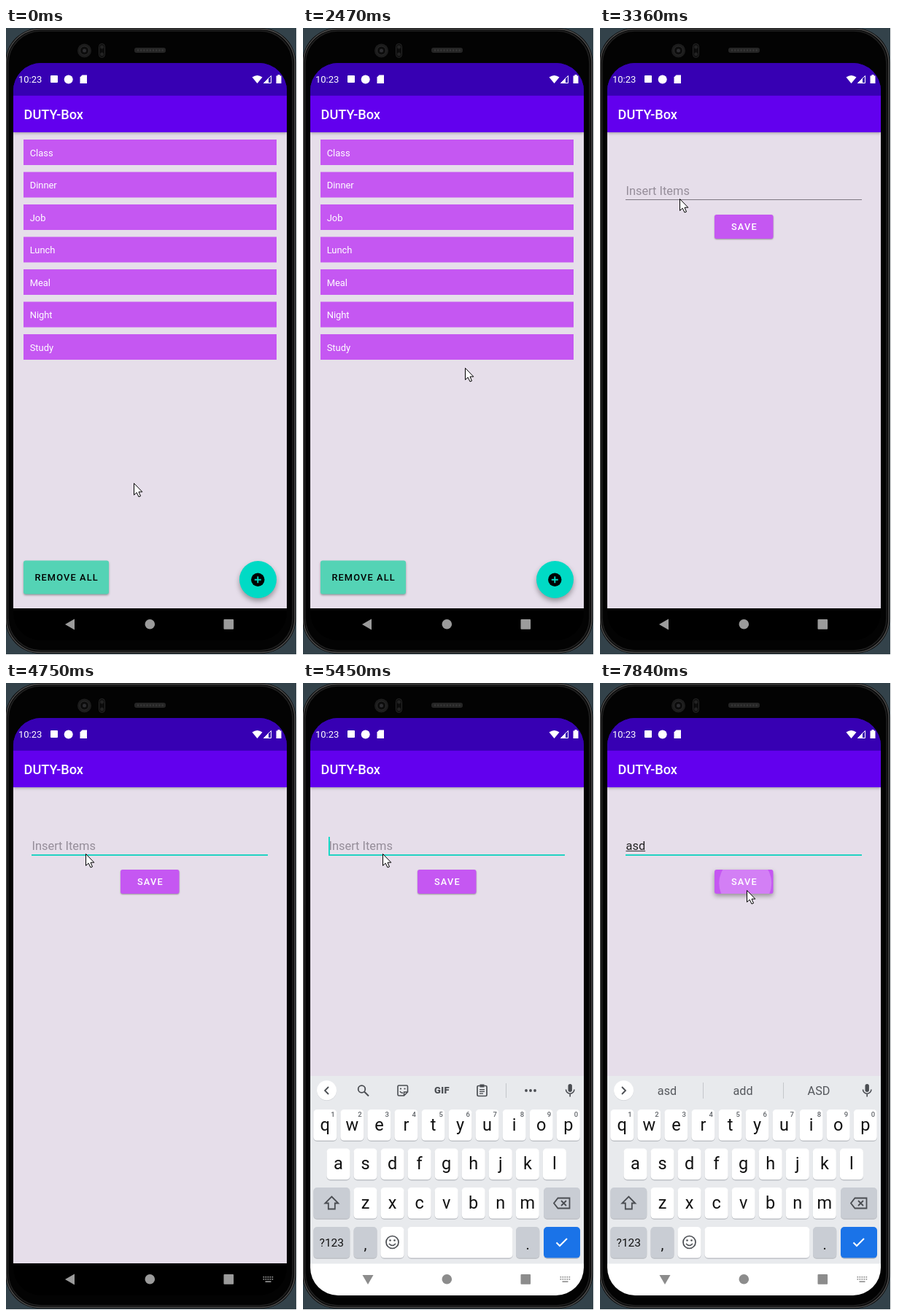
These frames come from a looping animation (399 px wide and 860 px high, 7.99 s). An HTML page with a canvas:

```html
<!DOCTYPE html>
<html lang="en">
<head>
<meta charset="utf-8">
<style>
  html, body { margin: 0; width: 100%; height: 100%; overflow: hidden; background: #fff; }
  canvas { display: block; }
</style>
</head>
<body>
<canvas id="stage" width="399" height="860"></canvas>
<script>
const ctx = document.getElementById('stage').getContext('2d');
const LOOP = 7990;
const PALE = '#e6deea', VIOLET = '#c557f2', TEAL = '#00dac5', INK = '#4a4d52';

// Held values: [time, ...value], each valid until the next one
const POINTER = [
  [0, 175, 624], [150, 162, 610], [280, 143, 600], [410, 136, 585], [540, 165, 574], [670, 230, 590],
  [800, 281, 655], [930, 304, 710], [1050, 321, 748],
  [2170, 311, 715], [2320, 272, 600], [2470, 222, 466], [2620, 180, 374], [2770, 166, 350],
  [2930, 159, 338], [3080, 156, 333], [3230, 130, 276], [3360, 109, 234],
  [6620, 165, 264], [6760, 201, 286], [7320, 201, 284]
];
const TYPED = [[0, ''], [5760, 'a'], [5910, 'as'], [6050, 'asd']];
const CARET = [[0, 0], [3920, 1], [4750, 0], [5330, 1], [6620, 0], [7320, 1], [7720, 0]];
const held = (keys, t) => keys.findLast(k => k[0] <= t).slice(1);

function text(str, x, y, size, color, { weight = 400, align = 'left', spacing = 0 } = {}) {
  ctx.font = `${weight} ${size}px Roboto, sans-serif`;
  ctx.letterSpacing = spacing + 'px';
  ctx.textAlign = align;
  ctx.fillStyle = color;
  ctx.fillText(str, x, y);
}

function rect(x, y, w, h, color) {
  ctx.fillStyle = color;
  ctx.fillRect(x, y, w, h);
}

function box(x, y, w, h, r, fill, stroke, width = 1) {
  ctx.beginPath();
  ctx.roundRect(x, y, w, h, r);
  paint(fill, stroke, width);
}

function disc(x, y, r, fill, stroke, width = 1) {
  ctx.beginPath();
  ctx.arc(x, y, r, 0, 7);
  paint(fill, stroke, width);
}

function shape(d, fill, stroke, width = 1) {
  const path = new Path2D(d);
  if (fill) { ctx.fillStyle = fill; ctx.fill(path); }
  if (stroke) { ctx.strokeStyle = stroke; ctx.lineWidth = width; ctx.stroke(path); }
}

function paint(fill, stroke, width) {
  if (fill) { ctx.fillStyle = fill; ctx.fill(); }
  if (stroke) { ctx.strokeStyle = stroke; ctx.lineWidth = width; ctx.stroke(); }
}

function group(draw) {
  ctx.save();
  draw();
  ctx.restore();
}

function shadowed(blur, dy, draw) {
  group(() => {
    ctx.shadowColor = 'rgba(0,0,0,.35)';
    ctx.shadowBlur = blur;
    ctx.shadowOffsetY = dy;
    draw();
  });
}

function phone() {
  rect(0, 0, 399, 860, '#fff');
  rect(0, 0, 398, 859, '#33424a');
  box(-1, 0, 398.5, 858, 48, '#0a0a0a');
  box(0.5, 1.5, 395.5, 855, 47, '#080808', '#4c4c4c', 1.5);
  box(3, 4, 390, 850, 45, '#030303', '#202020', 1.5);
  disc(107.5, 31, 9.5, '#1c1c1c');
  disc(107.5, 31, 6, '#0c0c0c', '#2c2c2c');
  disc(107.5, 31, 2.5, '#2d2d30');
  box(127.5, 21.5, 8, 19, 4, '#0c0c0c', '#262626');
  disc(131.5, 26, 2.5, '#222');
  disc(131.5, 36, 2.5, '#222');
  box(176, 27, 43, 7, 3, '#252525');
  for (let i = 0; i < 9; i++) disc(181 + i * 4.2, 30.5, 1.2, '#393939');
}

function statusIcons() {
  text('10:23', 17, 75, 13, '#fff');
  box(61, 65, 10, 10, 1, '#fff');
  disc(85.7, 70.5, 6, '#fff');
  shape('M104.5 64.5h6.5v11.5h-9.5v-8.5z', '#fff');
  shape('M337.5 67.5q7-5 14 0l-7 8.5z', '#fff');
  shape('M363.5 65.5v10h-10z', null, '#fff');
  shape('M360 68.5v7.5h-7z', '#fff');
  shape('M370.5 65.5h2v-1.5h3v1.5h2v10.5h-7z', '#fff');
}

function appFrame() {
  rect(10, 48, 375, 45, '#3700b3');
  rect(10, 143, 375, 653, PALE);
  rect(10, 796, 375, 44, '#000');
  shadowed(4, 1, () => rect(10, 92.5, 375, 50.5, '#6200ee'));
  rect(10, 48, 375, 44.5, '#3700b3');
  text('DUTY-Box', 24.5, 125, 18.2, '#fff', { weight: 500 });
}

function button(label, x, y, w, h, fill, color, lift, rippleRadius = 0) {
  shadowed(lift * 2, lift, () => box(x, y, w, h, 3, fill));
  if (rippleRadius) group(() => {
    ctx.beginPath();
    ctx.roundRect(x, y, w, h, 3);
    ctx.clip();
    disc(x + w / 2 + 2, y + h / 2 + 2, rippleRadius, 'rgba(255,255,255,.24)');
  });
  text(label, x + w / 2 + 0.6, y + h / 2 + 4.6, 12.77, color, { weight: 500, align: 'center', spacing: 1.14 });
}

function listScreen(t) {
  appFrame();
  ['Class', 'Dinner', 'Job', 'Lunch', 'Meal', 'Night', 'Study'].forEach((name, i) => {
    const y = 153 + i * 44.5;
    rect(24, y, 347, 35, VIOLET);
    text(name, 32.7, y + 22.5, 12.9, '#fff');
  });
  button('REMOVE ALL', 24, 730.5, 117, 46, '#54d3b5', '#000', 1.5);
  const pressed = t >= 1470 && t < 1770;
  shadowed(pressed ? 11 : 7, pressed ? 5 : 4, () => disc(345.5, 756.5, 25.5, TEAL));
  disc(345.3, 756.7, 9.2, '#000');
  shape('M340.8 756.7h9M345.3 752.2v9', null, TEAL, 1.9);
}

function formScreen(t) {
  appFrame();
  const [typed] = held(TYPED, t);
  const focused = t >= 3920;
  if (typed) {
    text(typed, 35.5, 228.8, 16.4, '#222');
    rect(35.5, 230, ctx.measureText(typed).width, 1, '#333');
  } else {
    text('Insert Items', 35.5, 228.8, 16.4, '#958d99');
  }
  if (focused) rect(35, 235, 324, 2, '#22d3c3');
  else rect(35, 235, 324, 1, '#7d7781');
  if (held(CARET, t)[0]) {
    ctx.font = '16.4px Roboto, sans-serif';
    rect(35 + ctx.measureText(typed).width, 211, 1.8, 24, TEAL);
  }
  const ripple = t >= 7840 ? 36 : t >= 7720 ? 17 : 0;
  button('SAVE', 157, 256, 80.5, 33, VIOLET, '#fff', ripple ? 3 : 1, ripple);
}

function scaled(s, draw) {
  group(() => {
    ctx.translate(197.5, 445);
    ctx.scale(s, s);
    ctx.translate(-197.5, -445);
    draw();
  });
}

// The list grows behind while the form zooms in
function screens(t) {
  if (t < 2470) return listScreen(t);
  if (t >= 3080) return formScreen(t);
  const elapsed = Math.floor((t - 2470) / 150) * 150;
  const p = 1 - Math.exp(-elapsed * 0.01143);
  scaled(1 + 0.05 * p, () => listScreen(t));
  if (p > 0) scaled(0.85 + 0.15 * p, () => formScreen(t));
}

function key(label, x, y, w = 32, fill = '#fff', size = 23.5, dy = 28.5) {
  box(x, y + 1, w, 43, 5, '#bfc2c7');
  box(x, y, w, 42.6, 5, fill);
  text(label, x + w / 2, y + dy, size, '#111', { align: 'center' });
}

function toolbarIcons() {
  shape('M35 554l-5 5 5 5', null, INK, 1.8);
  disc(80.5, 557, 4.8, null, INK, 1.8);
  shape('M84 560.5l6 6', null, INK, 2);
  shape('M131.5 552h10.5q1.5 0 1.5 1.5v7.5l-5 5h-7q-1.500 0-1.500-1.500v-11q0-1.500 1.500-1.500zM138.500 566v-5h5M133 560q1.500 3 4 2', null, INK, 1.6);
  disc(134, 556.5, 1.1, INK);
  disc(139.5, 556.5, 1.1, INK);
  text('GIF', 190.5, 563.3, 13, INK, { weight: 900, align: 'center', spacing: 0.4 });
  box(239, 552.5, 13, 14, 1.5, null, INK, 1.7);
  rect(242.5, 550.5, 6, 4, INK);
  for (let i = 0; i < 3; i++) rect(242, 557 + i * 2.7, i < 2 ? 7 : 5, 1.3, INK);
  rect(278, 549, 1, 20, '#c4c7cb');
  for (let i = 0; i < 3; i++) disc(306 + i * 6, 559, 1.9, INK);
}

function suggestions() {
  shape('M30 554l5 5-5 5', null, INK, 1.8);
  ['asd', 'add', 'ASD'].forEach((word, i) =>
    text(word, 92 + i * 104, 565, 16.2, '#55585d', { align: 'center' }));
  rect(141, 548, 1, 22, '#c4c7cb');
  rect(251, 548, 1, 22, '#c4c7cb');
}

function keyboard(t) {
  rect(10, 539, 375, 258, '#e8eaed');
  disc(32.5, 559.5, 13.5, '#cfd2d6');
  disc(32.5, 558.7, 13.5, '#fff');
  if (t < 5910) toolbarIcons(); else suggestions();
  box(363.5, 550, 5.4, 11, 2.7, INK);
  shape('M360.500 557.500a5.700 5.700 0 0 0 11.400 0M366.200 563.500v4', null, INK, 1.6);

  [...'qwertyuiop'].forEach((c, i) => {
    key(c, 14.3 + i * 37.05, 585);
    text((i + 1) % 10, 41 + i * 37.05, 595, 9.5, '#5f6368', { align: 'center', weight: 500 });
  });
  [...'asdfghjkl'].forEach((c, i) => key(c, 32.5 + i * 37.05, 638.5));
  [...'zxcvbnm'].forEach((c, i) => key(c, 69.5 + i * 37.05, 692));
  const grey = '#c9cdd4';
  key('', 14.3, 692, 50, grey);
  key('', 330, 692, 50, grey);
  key('?123', 14.3, 746, 50, grey, 15.5, 27);
  key(',', 69.5, 746, 32, grey, 20, 31);
  key('', 106.5, 746);
  key('', 143.5, 746, 144);
  key('.', 292, 746, 32.3, grey, 20, 31);
  key('', 330, 746, 50, '#1a73e8');

  shape('M39.300 704.500l9 9h-4.500v8h-9v-8h-4.500z', null, INK, 1.8);
  shape('M349.500 706.500h16v14h-16l-5.500-7zM354 710l7 7M361 710l-7 7', null, INK, 1.8);
  disc(122.500, 767, 8.5, null, INK, 1.7);
  disc(119.5, 764.5, 1.3, INK);
  disc(125.500, 764.5, 1.3, INK);
  shape('M118 769q4.500 5 9 0', null, INK, 1.6);
  shape('M347.500 767.500l4.500 4.500 10-10', null, '#fff', 2);
}

function navigation(t) {
  const light = t >= 5330;
  const color = light ? '#8c8c8c' : '#9b9b9b';
  if (light) rect(10, 796.5, 375, 44, '#fff');
  const turn = t >= 5050 ? 1 : t >= 4900 ? 0.5 : 0;
  group(() => {
    ctx.translate(88 + turn, 818);
    ctx.rotate(-turn * Math.PI / 2);
    shape('M-7 0L6-7.500V7.500z', color);
  });
  disc(197.3, 817.8, 6.8, color);
  box(298.5, 811, 13.6, 13.8, 1, color);
  if (t >= 4220) {
    for (let i = 0; i < 10; i++) rect(352.5 + (i % 5) * 3, 814 + Math.floor(i / 5) * 3, 1.7, 1.6, color);
    rect(355.5, 820.3, 8, 1.6, color);
  }
}

function draw(t) {
  phone();
  group(() => {
    ctx.beginPath();
    ctx.roundRect(10, 48, 375, 792, 38);
    ctx.clip();
    screens(t);
    if (t >= 5330) group(() => {
      if (t < 5450) ctx.translate(0, 60);
      keyboard(t);
    });
    navigation(t);
    statusIcons();
  });
  group(() => {
    ctx.translate(...held(POINTER, t).map(v => v + 0.5));
    shape('M0 0V16L3.700 12.700 6.500 18.500 9 17.500 6.500 11.700H11.300z', '#fff', '#000');
  });
}

function frame(now) {
  draw(now % LOOP);
  requestAnimationFrame(frame);
}
requestAnimationFrame(frame);
</script>
</body>
</html>
```
